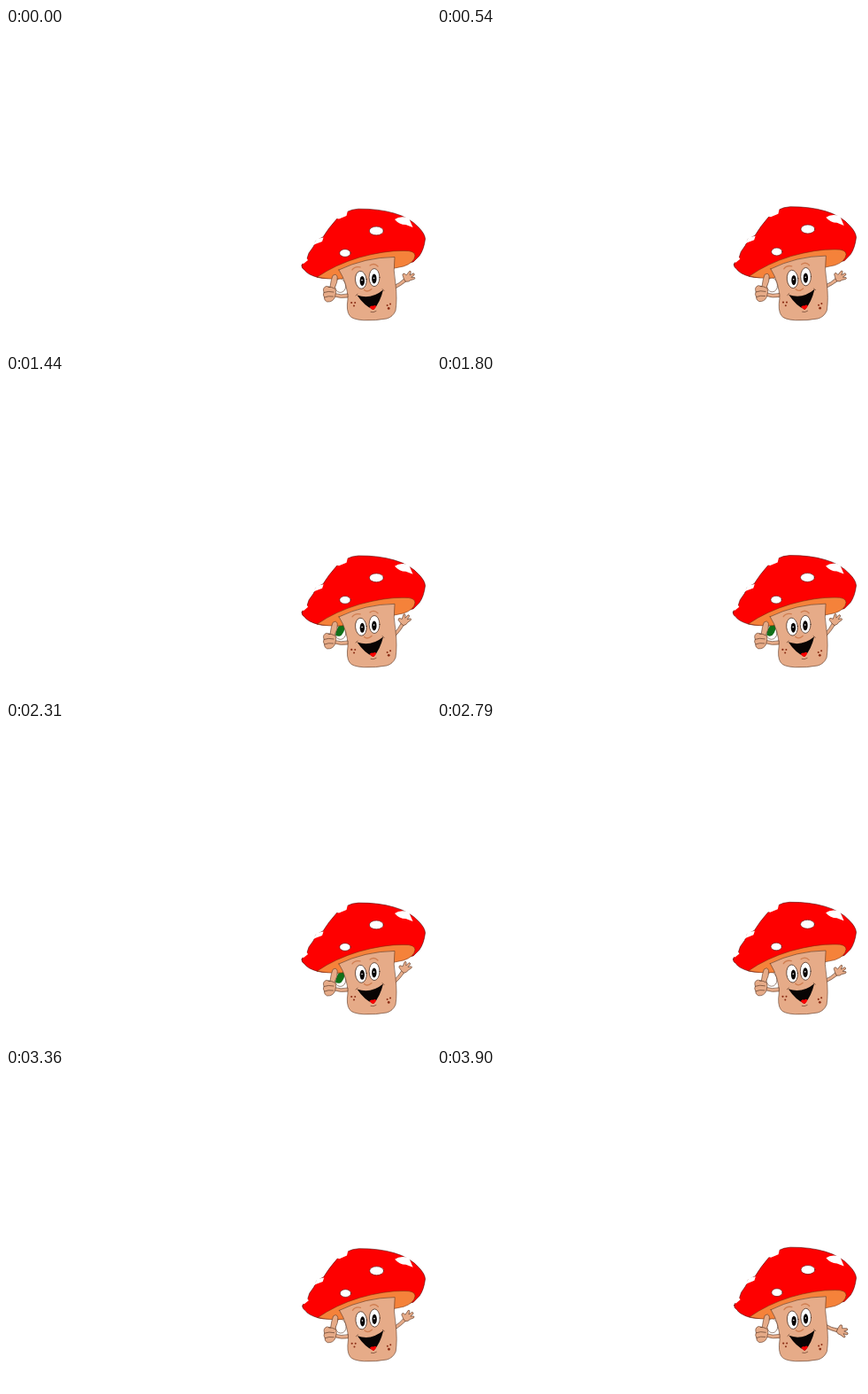
These frames come from a looping animation (480 by 360 pixels, 3.93 s). An HTML page:

```html
<!DOCTYPE html>
<html lang="en">
<head>
<meta charset="utf-8">
<title>Waving mushroom</title>
<style>
  html, body { margin: 0; width: 100%; height: 100%; overflow: hidden; background: #fff; }
  svg { display: block; width: 480px; height: 360px; }
  path, ellipse { stroke-linejoin: round; stroke-linecap: round; }
  .line { fill: none; stroke: #4a2a1c; stroke-width: .6; }
  .skin { fill: #e6ab88; stroke: #5c3826; stroke-width: .6; }
  .red { fill: #fe0000; stroke: #400; stroke-width: .55; }
  .orange { fill: #f5823a; stroke: #7a3210; stroke-width: .6; }
  .white { fill: #fff; }
  .spot { fill: #fff; stroke: #500; stroke-width: .6; }
  .eye { fill: #fff; stroke: #3a2014; stroke-width: .7; }
  .black { fill: #080404; }
  .brown { fill: #8a2c14; }
  .brow { fill: none; stroke: #cf7d50; stroke-width: 1.3; }
</style>
</head>
<body>
<svg viewBox="0 0 480 360">
  <g id="body">
    <!-- waving arm, drawn pointing right from the shoulder -->
    <g id="arm">
      <path class="skin" d="M-3 -1.8 Q6 -.2 13 -2 L13 1.8 Q6 2.6 -3 1.8Z"/>
      <path class="skin" d="M12.5 -2.4 Q13 -4.2 13.6 -6.6 Q15.6 -8.2 16.4 -6.2 L17 -4
        L22.4 -5.8 Q24.2 -5.2 23 -3.8 L20.2 -1.8 L24.8 -1.5 Q26 -.2 24.6 .8
        L20.4 1 L23.4 3.2 Q23.8 5 21.8 4.6 L18 3.4 Q15 4.2 12.5 1.8Z"/>
    </g>

    <path class="white" stroke="#5c3826" stroke-width=".6"
      d="M375 283 Q380 281 383 288 Q385 295 380 298 Q374 300 371.5 293 Q371 287 375 283Z"/>
    <path id="leaf" d="M372 293.5 Q373 285 378 281.5 L382.5 282 Q383 289 378.5 294 Q374.5 296 372 293.5Z"/>

    <path class="red" d="M334 268 Q335 264 340 260 L342 254 L347 247 L350 240 L358 236
      Q364 226 374 215 L384 208 Q391 204.4 398 204.2 Q421 204 438 209 Q456 214 466 225
      Q473 232 473.5 238 Q472 250 467 257 L460 264 L439 268 L376 281 Q362 284 352 281.5
      Q340 278 337 273 Q333.5 271 334 268Z"/>
    <path class="orange" d="M351.5 281 Q372 267 399 259 Q428 251 449 251.5 Q462 251 462 257
      Q461 265 449 269 L439 271 L379 283 Q364 284 351.5 281Z"/>

    <path class="white" d="M371.5 214.5 L379 208 L386 206 L384.5 212 L376 215.5Z"/>
    <path class="white" d="M345 247 L351 238 L358.5 236.5 L357 241 L349 244Z"/>
    <path class="white" d="M333 265 L339 259 L341 262 L336 266Z"/>
    <path class="white" d="M439 216 Q445 211.5 455 214.5 L459.5 225 L451.5 222 Q444 222 439 216Z"/>
    <ellipse class="spot" cx="418.3" cy="229" rx="8" ry="4.9"/>
    <ellipse class="spot" cx="382.9" cy="254" rx="6.2" ry="4.3"/>

    <path class="skin" d="M376 273 Q405 259 439 258.5 Q437 274 440 289 Q442 306 440 319
      Q437 326 430 328 Q418 330.3 404 329.8 Q391 329 388 324.5 Q384 319 386 306 Q386 289 376 273Z"/>

    <!-- thumbs-up arm -->
    <path class="skin" d="M371 299.5 Q378 302 386 300 L386 304 Q378 305.5 371 303Z"/>
    <path class="skin" d="M366 292 Q367 284 369 279.5 Q373 276.5 374.2 281 Q374.6 287 371.5 292.5
      Q374 298 371.4 304 Q369 309.5 362.5 309 Q358.8 307 359.5 304 Q357.4 301 359 298.5 Q357 293 361.5 291.5Z"/>
    <path class="line" d="M359 298.5 Q364 296.5 370 298 M359.5 304 Q364 302 369.5 303 M364 292.3 Q368 292 371 294"/>

    <ellipse class="eye" cx="400.8" cy="284.3" rx="6.3" ry="10" transform="rotate(-6 401 284)"/>
    <ellipse class="eye" cx="416" cy="281.6" rx="5.9" ry="10"/>
    <ellipse class="black" cx="402.3" cy="285.4" rx="2.7" ry="5.5"/>
    <ellipse class="black" cx="415.8" cy="283" rx="2.7" ry="5.5"/>
    <circle class="white" cx="402" cy="284.6" r=".8"/>
    <circle class="white" cx="415.6" cy="282.2" r=".8"/>
    <path class="brow" d="M391 273 Q394 268.6 400 270 M411 268 Q416 264.6 420 269"/>
    <path class="brow" d="M404.5 295.5 Q408 299 413 294.6"/>

    <path class="black" d="M396.5 301.5 Q412 307 426 295.5 Q422.5 310 415 318 Q405 314 396.5 301.5Z"/>
    <path d="M410.5 315 Q412.4 312.8 414.5 313.8 Q416.6 312 418.2 314 Q416 318.4 413.8 318Z" fill="#f00"/>
    <path class="line" d="M395 302 L397 300.2 M425 294.8 L427.2 296.4 M412 320.5 Q414.8 321.6 418 319.5"/>

    <g class="brown">
      <circle cx="390.2" cy="310" r="1.1"/><circle cx="394.2" cy="310" r="1"/><circle cx="393" cy="313.6" r="1"/>
      <circle cx="430.6" cy="313" r="1"/><circle cx="434" cy="311.4" r="1"/><circle cx="432.2" cy="316.4" r="1.4"/>
    </g>
  </g>
</svg>
<script>
  const STEP = 30, STEPS = 131;
  // Phase in degrees at these steps; both cycles take roughly 450 ms.
  const keys = [0, 18, 34, 60, 93, 112, 130];
  const bob = [15, 490, 792, 1387, 2226, 2610, 3060];
  const wave = [-67, 431, 743, 1415, 2229, 2578, 3060];

  const body = document.getElementById("body");
  const arm = document.getElementById("arm");
  const leaf = document.getElementById("leaf");

  function cosAt(phases, step) {
    let i = 0;
    while (i < keys.length - 2 && step >= keys[i + 1]) i++;
    const f = (step - keys[i]) / (keys[i + 1] - keys[i]);
    return Math.cos((phases[i] + f * (phases[i + 1] - phases[i])) * Math.PI / 180);
  }

  function draw(now) {
    const step = Math.floor(now / STEP) % STEPS;
    const stretch = (1 - cosAt(bob, step)) / 2;
    const lift = cosAt(wave, step);
    body.setAttribute("transform",
      `translate(474 330) scale(${1 - .012 * stretch} ${1 + .024 * stretch}) translate(-474 -330)`);
    arm.setAttribute("transform", `translate(440 291.5) rotate(${-18 - 38 * lift})`);
    leaf.setAttribute("fill", lift > .91 ? "#18a018" : lift > .8 ? "#107018" : "none");
  }

  const start = performance.now();
  function tick() {
    draw(performance.now() - start);
    requestAnimationFrame(tick);
  }
  draw(0);
  requestAnimationFrame(tick);
</script>
</body>
</html>
```
